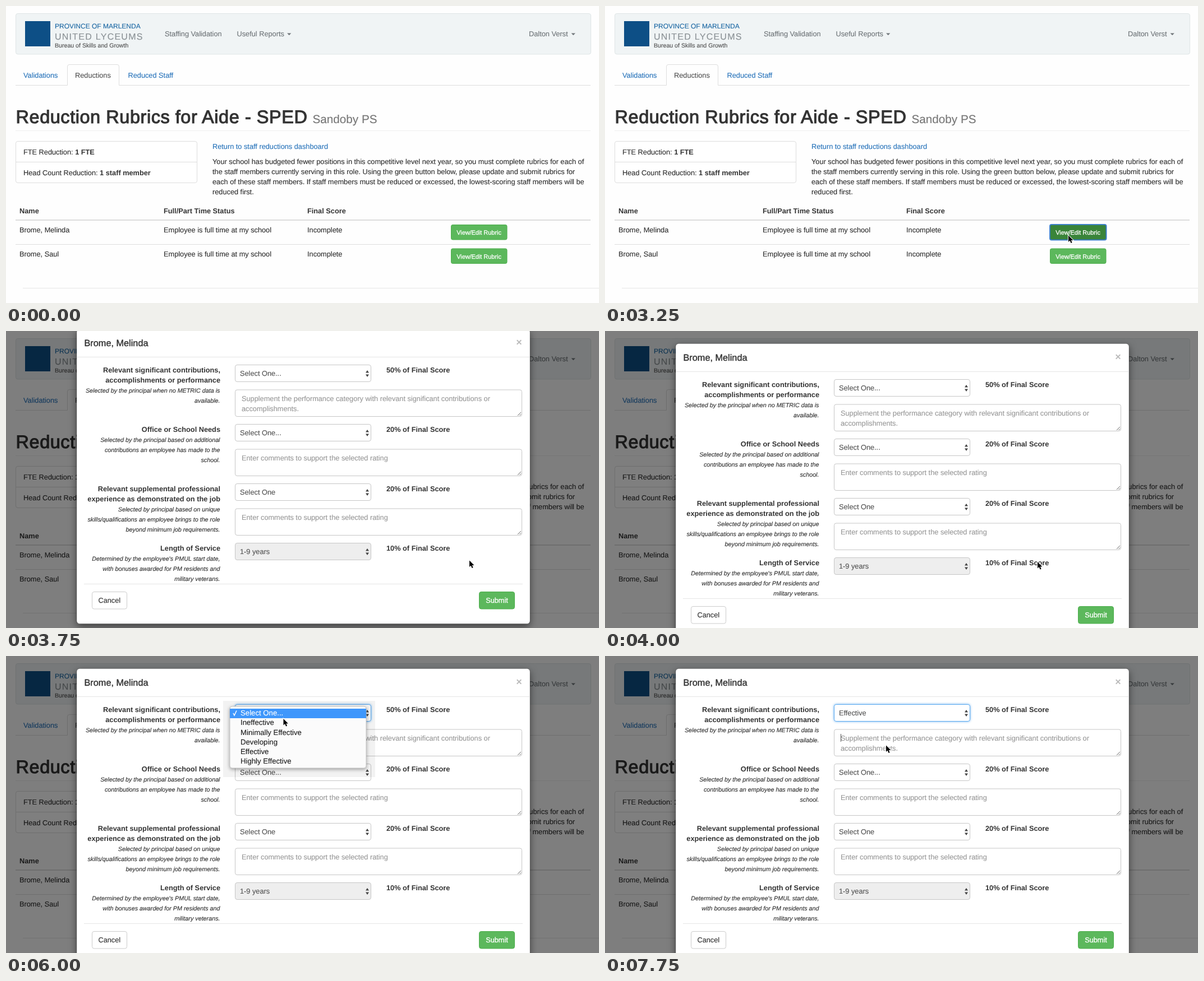
Write an HTML page that moves like this. It is 1057x530 px and loops after 8000 ms.

```html
<!DOCTYPE html>
<html lang="en">
<head>
<meta charset="utf-8">
<title>Reduction rubrics</title>
<style>
  html, body { margin: 0; width: 100%; height: 100%; overflow: hidden; background: #fefefe; }
  svg { display: block; width: 100%; height: 100%; }
  text { font: 12.75px "Liberation Sans", Arial, sans-serif; color: #333; fill: currentColor; stroke: currentColor;
    stroke-width: .15; white-space: pre; text-rendering: geometricPrecision; }
  .b { font-weight: bold; stroke: none; }
  .link { color: #2a75bb; }
  .nav { color: #70767a; }
  .soft { color: #999; }
  .field { color: #555; }
  .note { font-size: 10.75px; font-style: italic; }
  .small { font-size: 10.9px; }
  .white { color: #fff; stroke-width: .3; }
  .end { text-anchor: end; }
  .mid { text-anchor: middle; }
  .h1 { font-size: 32.5px; letter-spacing: .54px; stroke-width: 1.1; }
  .sub { font-size: 20.7px; color: #777; }
  .title { font-size: 16.3px; stroke-width: .4; }
  .item { font-size: 13.2px; }
  #dialog { filter: drop-shadow(0 5px 7px rgba(0,0,0,.5)); }
  #list { filter: drop-shadow(0 2px 3px rgba(0,0,0,.35)); }
  .glow { filter: drop-shadow(0 0 2px rgba(80,160,235,.8)); }
</style>
</head>
<body>
<svg id="stage" viewBox="0 0 1057 530"></svg>
<script>
const LOOP = 8000;
const PERSON = 'Brome, Melinda';
const RATINGS = ['Select One...', 'Ineffective', 'Minimally Effective', 'Developing', 'Effective', 'Highly Effective'];

// SVG helpers
const text = (x, y, s, cls = '', extra = '') => `<text x="${x}" y="${y}" class="${cls}" ${extra}>${s}</text>`;
const lines = (x, y, rows, cls) => rows.map((s, i) => text(x, y + 18 * i, s, cls)).join('');
const box = (x, y, w, h, fill, stroke = 'none', r = 3.6, extra = '') =>
  `<rect x="${x}" y="${y}" width="${w}" height="${h}" rx="${r}" fill="${fill}" stroke="${stroke}" ${extra}/>`;
const rule = (x1, x2, y, color = '#ddd', w = 1) =>
  `<path d="M${x1} ${y}H${x2}" stroke="${color}" stroke-width="${w}"/>`;
const shape = (d, fill) => `<path d="${d}" fill="${fill}"/>`;
const caret = x => shape(`M${x} 48.5h7.4l-3.7 3.8z`, '#70767a');

function staffRow(y, name, id) {
  return text(24, y, name) + text(281, y, 'Employee is full time at my school') + text(537, y, 'Incomplete') +
    box(793.5, y - 13.5, 99.5, 26.5, '#5cb85c', '#4cae4c', 2.7, `id="${id}"`) +
    text(843, y + 4, 'View/Edit Rubric', 'small white mid');
}

function page() {
  return box(17.5, 13.5, 1025, 72.5, '#f0f4f5', '#dfe5e6') +
    box(34, 27, 45, 45, '#0d4f86', 'none', 0) +
    text(87, 40, 'PROVINCE OF MARLENDA', '', 'style="font-size:12px;color:#1f6aa5"') +
    text(87, 59.5, 'UNITED LYCEUMS', '', 'style="font-size:16px;letter-spacing:1.25px;color:#8b9296"') +
    text(87, 74, 'Bureau of Skills and Growth', '', 'style="font-size:10.6px;color:#555"') +
    text(283, 54, 'Staffing Validation', 'nav') + text(411.5, 54, 'Useful Reports', 'nav') + caret(501) +
    text(932, 54, 'Dalton Verst', 'nav') + caret(1007.5) +
    text(31, 128, 'Validations', 'link') + text(123, 128, 'Reductions', 'field') + text(217.5, 128, 'Reduced Staff', 'link') +
    '<path d="M17 141.5H109.5V108a3.5 3.5 0 0 1 3.5-3.5H198a3.5 3.5 0 0 1 3.5 3.5V141.5H1042" fill="none" stroke="#ddd"/>' +
    text(17.5, 209, 'Reduction Rubrics for Aide - SPED', 'h1') + text(546.5, 209, 'Sandoby PS', 'sub') +
    rule(17, 1042, 222.5, '#eee') +
    box(17.5, 241.5, 323, 74, '#fff', '#ddd') + rule(17, 340, 278.5) +
    text(31, 264.5, 'FTE Reduction: <tspan class="b">1 FTE</tspan>') +
    text(31, 301.5, 'Head Count Reduction: <tspan class="b">1 staff member</tspan>') +
    text(368, 255, 'Return to staff reductions dashboard', 'link') +
    lines(368, 281.7, [
      'Your school has budgeted fewer positions in this competitive level next year, so you must complete rubrics for each of',
      'the staff members currently serving in this role. Using the green button below, please update and submit rubrics for',
      'each of these staff members. If staff members must be reduced or excessed, the lowest-scoring staff members will be',
      'reduced first.']) +
    text(24, 370, 'Name', 'b') + text(281, 370, 'Full/Part Time Status', 'b') + text(537, 370, 'Final Score', 'b') +
    rule(17, 1042, 382, '#ddd', 2) + staffRow(404, PERSON, 'edit') +
    rule(17, 1042, 425.5) + staffRow(446.5, 'Brome, Saul', 'other') +
    box(793, 390, 100.5, 27.5, 'none', '#3f82c8', 3, 'id="ring" stroke-width="2"') +
    rule(30, 1057, 503.5, '#e6e6e6');
}

function formGroup(i, labels, notes, share, value, hint) {
  const y = 106 * i, fixed = !hint;
  let out = lines(382, 100 + y, labels, 'b end') +
    lines(381.5, 100 + y + 18 * labels.length, notes, 'note end') +
    box(408.5, 86.5 + y, 242, 30, fixed ? '#eee' : '#fff', '#c6c6c6', 3.6, `id="select${i}"`) +
    text(417, 106 + y, value, 'field', `id="value${i}"`) +
    shape(`M641 ${100.5 + y}l3-4.5 3 4.5zM641 ${103.5 + y}l3 4.5 3-4.5z`, '#444') +
    text(678, 100 + y, share + '% of Final Score', 'b');
  if (hint) out += box(408.5, 131 + y, 511, 47.5, '#fff', '#c6c6c6') + lines(420, 150.5 + y, hint, 'soft') +
    `<path d="M912 ${177 + y}l6-6M915.5 ${177 + y}l2.5-2.5" stroke="#666"/>`;
  return out;
}

function modal() {
  const comment = ['Enter comments to support the selected rating'];
  return box(126, 22.5, 808, 526, '#fff', 'rgba(0,0,0,.25)', 5.4, 'id="dialog"') +
    text(139.5, 53, PERSON, 'title') +
    text(914.5, 52, '×', 'b mid', 'style="font-size:18px;color:#bbb"') +
    rule(126.5, 933.5, 72.5, '#e5e5e5') +
    formGroup(0, ['Relevant significant contributions,', 'accomplishments or performance'],
      ['Selected by the principal when no METRIC data is', 'available.'], 50, RATINGS[0],
      ['Supplement the performance category with relevant significant contributions or', 'accomplishments.']) +
    formGroup(1, ['Office or School Needs'],
      ['Selected by the principal based on additional', 'contributions an employee has made to the', 'school.'],
      20, 'Select One...', comment) +
    formGroup(2, ['Relevant supplemental professional', 'experience as demonstrated on the job'],
      ['Selected by principal based on unique', 'skills/qualifications an employee brings to the role', 'beyond minimum job requirements.'],
      20, 'Select One', comment) +
    formGroup(3, ['Length of Service'],
      ["Determined by the employee's PMUL start date,", 'with bonuses awarded for PM residents and', 'military veterans.'],
      10, '1-9 years') +
    '<path id="typing" d="M420.5 139v14" stroke="#555"/>' +
    rule(139, 921, 477.5, '#e5e5e5') +
    box(153.5, 491.5, 62, 30.5, '#fff', '#ccc') + text(184.3, 511.3, 'Cancel', 'mid') +
    box(843.5, 491.5, 63, 30.5, '#5cb85c', '#4cae4c') + text(875, 511.3, 'Submit', 'white mid');
}

function menu() {
  return box(387, 80, 271, 136, 'rgba(0,0,0,.05)', 'none', 0) +
    box(399, 90, 243, 110, '#fbfbfb', '#c4c4c4', 4, 'id="list"') +
    box(399, 94, 243, 17, '#3f97fb', 'none', 0, 'id="highlight"') +
    '<path id="check" d="M405 102l2 4 4-8.5" fill="none" stroke="#222" stroke-width="1.5"/>' +
    RATINGS.map((s, i) => text(418, 106.3 + 17.1 * i, s, 'item')).join('');
}

document.getElementById('stage').innerHTML = page() +
  box(0, 0, 1057, 530, '#000', 'none', 0, 'id="shade"') +
  `<g id="modal">${modal()}</g><g id="menu">${menu()}</g>` +
  '<path id="cursor" d="M0 0V11.6L2.7 9.1 4.5 13.6 6.6 12.7 4.8 8.4H8.4Z" fill="#000" stroke="#fff" paint-order="stroke" stroke-width="1.8"/>';

const el = Object.fromEntries([...document.querySelectorAll('[id]')].map(e => [e.id, e]));
const items = [...document.querySelectorAll('.item')];
const show = (e, on) => { e.style.display = on ? '' : 'none'; };
const set = (e, attrs) => { for (const k in attrs) e.setAttribute(k, attrs[k]); };

// Each track holds [start time, ...values] and keeps its values until the next start.
const cursorTrack = [
  [1750, 758.5, 10], [2000, 763, 97], [2250, 791, 178], [2500, 815, 253], [2750, 829, 370], [3000, 826, 409.5],
  [4000, 771, 412], [4250, 543, 299], [4500, 495.5, 177], [4750, 495.5, 112], [5000, 496, 105],
  [5500, 494.5, 103], [6000, 494.5, 112], [6250, 492, 143], [6500, 491, 157.5], [6750, 488, 171],
  [7000, 487, 169], [7500, 501, 159.5]];
const buttonTrack = [
  [0, '#5cb85c', '#4cae4c'], [1250, '#449d44', '#255625'], [3000, '#449d44', '#398439'],
  [3250, '#398439', '#255625'], [3500, '#449d44', '#398439']];
const shadeTrack = [[0, 0], [3500, .35], [3750, .5]];
const choiceTrack = [[5500, 0], [6250, 2], [6500, 3], [6750, 4]];
const at = (track, t) => track.findLast(k => k[0] <= t)?.slice(1);

function draw(t) {
  const pos = at(cursorTrack, t);
  show(el.cursor, pos);
  if (pos) set(el.cursor, { transform: `translate(${pos})` });

  const [fill, stroke] = at(buttonTrack, t);
  set(el.edit, { fill, stroke });
  show(el.ring, t >= 1250);
  set(el.shade, { opacity: at(shadeTrack, t)[0] });

  show(el.modal, t >= 3750);
  set(el.modal, { transform: `translate(0 ${t < 4000 ? -26 : 0})` });

  const focused = t >= 5500, chosen = t >= 7250;
  set(el.select0, { stroke: focused ? '#5aaaf0' : '#c6c6c6', class: focused ? 'glow' : '' });
  el.value0.textContent = RATINGS[chosen ? 4 : 0];
  show(el.typing, t >= 7750);

  show(el.menu, focused && !chosen);
  const choice = at(choiceTrack, t)?.[0] ?? 0;
  set(el.highlight, { y: 94 + 17.1 * choice });
  items.forEach((e, i) => { e.style.color = i === choice ? '#fff' : '#222'; });
  set(el.check, { stroke: choice ? '#222' : '#fff' });
}

function tick() {
  draw(performance.now() % LOOP);
  requestAnimationFrame(tick);
}
tick();
</script>
</body>
</html>
```
